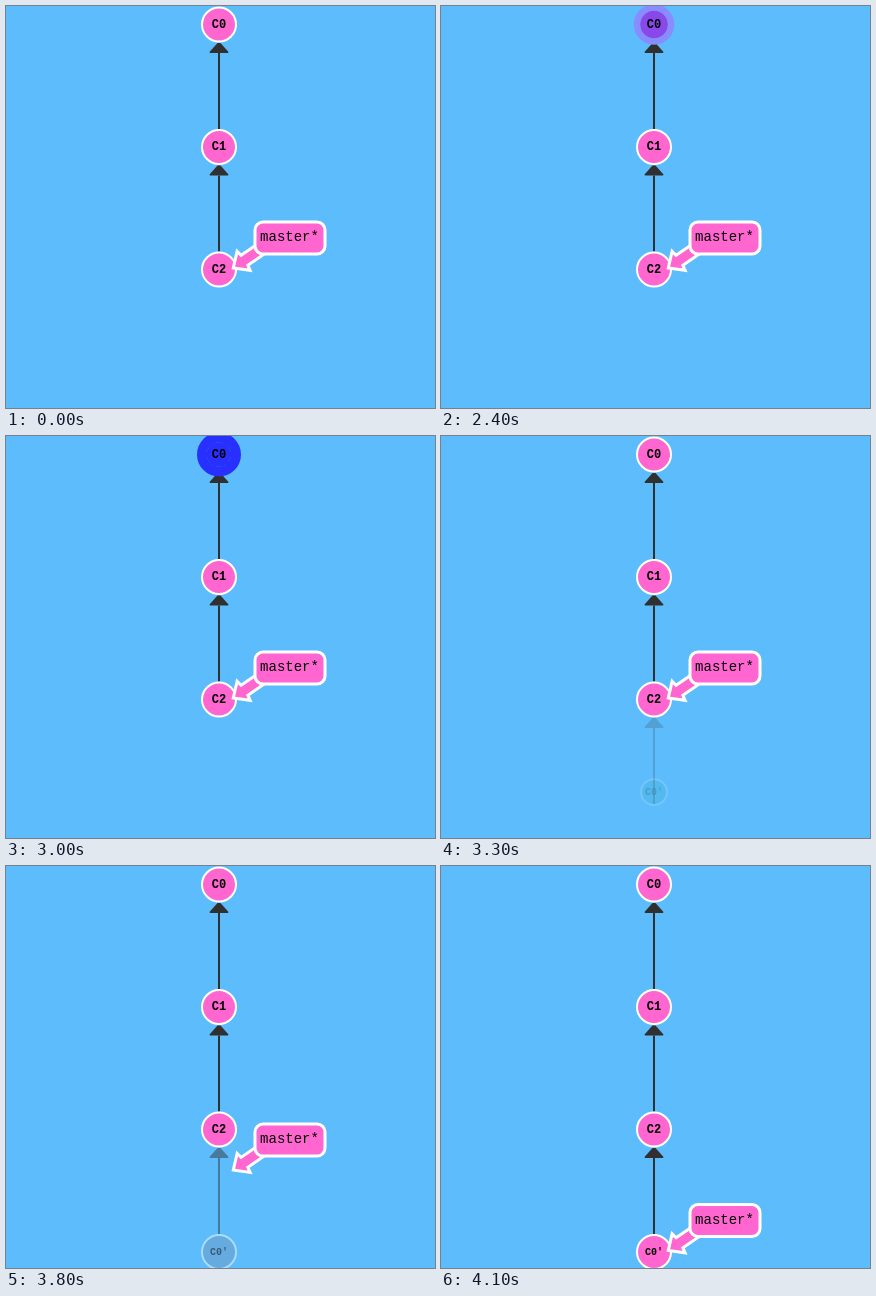
These frames come from a looping animation (429 by 402 pixels, 5200 ms). An HTML page with a canvas:

```html
<!DOCTYPE html>
<html lang="en">
<head>
<meta charset="utf-8">
<title>Commit tree</title>
<style>
  html, body { margin: 0; width: 100%; height: 100%; overflow: hidden; background: #5cbcfc; }
  canvas { display: block; }
</style>
</head>
<body>
<canvas id="stage" width="429" height="402"></canvas>
<script>
const ctx = document.getElementById('stage').getContext('2d');
const LOOP = 5200, STEP = 100;
const X = 213, TOP = 18.5, GAP = 122.5, R = 17;
const PINK = [255, 102, 208], TEAL = [36, 179, 179], BLUE = [40, 48, 255], WHITE = [255, 255, 255];
const DARK = '#303030';
const MONO = '"Liberation Mono", "Courier New", monospace';

const lerp = (a, b, p) => a + (b - a) * p;
const mix = (a, b, p) => `rgb(${a.map((v, i) => Math.round(lerp(v, b[i], p))).join(',')})`;
const span = (t, start, length) => Math.min(1, Math.max(0, (t - start) / length));
const rowY = row => TOP + GAP * row;

// Closed form of the ease-in-out cubic
function easeInOut(n) {
  if (n <= 0 || n >= 1) return n;
  const q = 0.48 - n / 1.04, Q = Math.sqrt(0.1734 + q * q);
  const u = Math.cbrt(Q - q) + Math.cbrt(-Q - q) + 0.5;
  return 3 * (1 - u) * u * u + u * u * u;
}

function bounce(n) {
  const s = 7.5625, d = 2.75;
  if (n < 1 / d) return s * n * n;
  if (n < 2 / d) return s * (n - 1.5 / d) ** 2 + 0.75;
  if (n < 2.5 / d) return s * (n - 2.25 / d) ** 2 + 0.9375;
  return s * (n - 2.625 / d) ** 2 + 0.984375;
}

function label(text, x, y, font) {
  ctx.font = `${font} ${MONO}`;
  ctx.fillStyle = '#000';
  ctx.fillText(text, x, y);
}

function node(text, y, { r = R, fill = mix(PINK, PINK, 0), stroke = '#fff', width = 2, alpha = 1, font = 'bold 12px' } = {}) {
  if (alpha <= 0 || r <= 0) return;
  ctx.globalAlpha = alpha;
  ctx.fillStyle = fill;
  ctx.beginPath();
  ctx.arc(X, y, Math.max(0, r - width / 2 + 0.2), 0, Math.PI * 2);
  ctx.fill();
  ctx.strokeStyle = stroke;
  ctx.lineWidth = width;
  ctx.beginPath();
  ctx.arc(X, y, r, 0, Math.PI * 2);
  ctx.stroke();
  label(text, X, y, font);
  ctx.globalAlpha = 1;
}

// Line from a child up to its parent, ending in an arrowhead
function edge(parentY, childY, alpha = 1) {
  if (alpha <= 0) return;
  const tip = parentY + 19.5, base = tip + 8;
  ctx.globalAlpha = alpha;
  ctx.fillStyle = ctx.strokeStyle = DARK;
  if (childY - 18 > base + 1) ctx.fillRect(X - 1, base + 1, 2, childY - 19 - base);
  ctx.beginPath();
  ctx.moveTo(X, tip - 1);
  ctx.lineTo(X + 1.5, tip - 1);
  ctx.lineTo(X + 9.5, base);
  ctx.lineTo(X + 9, base + 1);
  ctx.lineTo(X - 9, base + 1);
  ctx.lineTo(X - 9.5, base);
  ctx.lineTo(X - 1.5, tip - 1);
  ctx.closePath();
  ctx.fill();
  ctx.globalAlpha = 1;
}

function tag(text, dy) {
  ctx.save();
  ctx.translate(0, dy);
  ctx.fillStyle = mix(PINK, PINK, 0);
  ctx.strokeStyle = '#fff';
  ctx.lineWidth = 3;

  ctx.save();
  ctx.translate(227.3, 261.9);
  ctx.rotate(Math.atan2(-0.565, 0.825));
  ctx.beginPath();
  ctx.moveTo(0, 0);
  ctx.lineTo(12.5, -11.5);
  ctx.lineTo(13.5, -6);
  ctx.lineTo(42, -6);
  ctx.lineTo(42, 6);
  ctx.lineTo(13.5, 6);
  ctx.lineTo(12.5, 11.5);
  ctx.closePath();
  ctx.fill();
  ctx.stroke();
  ctx.restore();

  ctx.beginPath();
  ctx.roundRect(249, 216, 70, 32, 8);
  ctx.fill();
  ctx.stroke();
  label(text, 283.5, 231.5, '14px');
  ctx.restore();
}

function draw(t) {
  const glow = easeInOut(span(t, 2190, 396)) - easeInOut(span(t, 2990, 300));
  const grow = easeInOut(span(t, 2990, 300));
  const drop = bounce(span(t, 2990, 600));
  const move = easeInOut(span(t, 3650, 369));

  ctx.fillStyle = '#5cbcfc';
  ctx.fillRect(0, 0, 429, 402);

  edge(rowY(0), rowY(1));
  edge(rowY(1), rowY(2));
  edge(rowY(2), lerp(rowY(2), rowY(3), grow), lerp(0.2 * grow, 1, move));

  node("C0'", lerp(rowY(2), rowY(3), drop), {
    r: R * drop,
    fill: mix(TEAL, PINK, move),
    alpha: lerp(0.2 * drop, 1, move),
    font: 'bold 10px'
  });
  node('C0', rowY(0), {
    fill: mix(PINK, BLUE, glow),
    stroke: mix(WHITE, BLUE, glow),
    width: lerp(2, 10, glow)
  });
  node('C1', rowY(1));
  node('C2', rowY(2));
  tag('master*', GAP * move);
}

ctx.textAlign = 'center';
ctx.textBaseline = 'middle';
const begin = performance.now();

// The picture advances ten times a second
function tick() {
  const t = (performance.now() - begin) % LOOP;
  draw(Math.floor(t / STEP) * STEP);
  requestAnimationFrame(tick);
}
tick();
</script>
</body>
</html>
```
